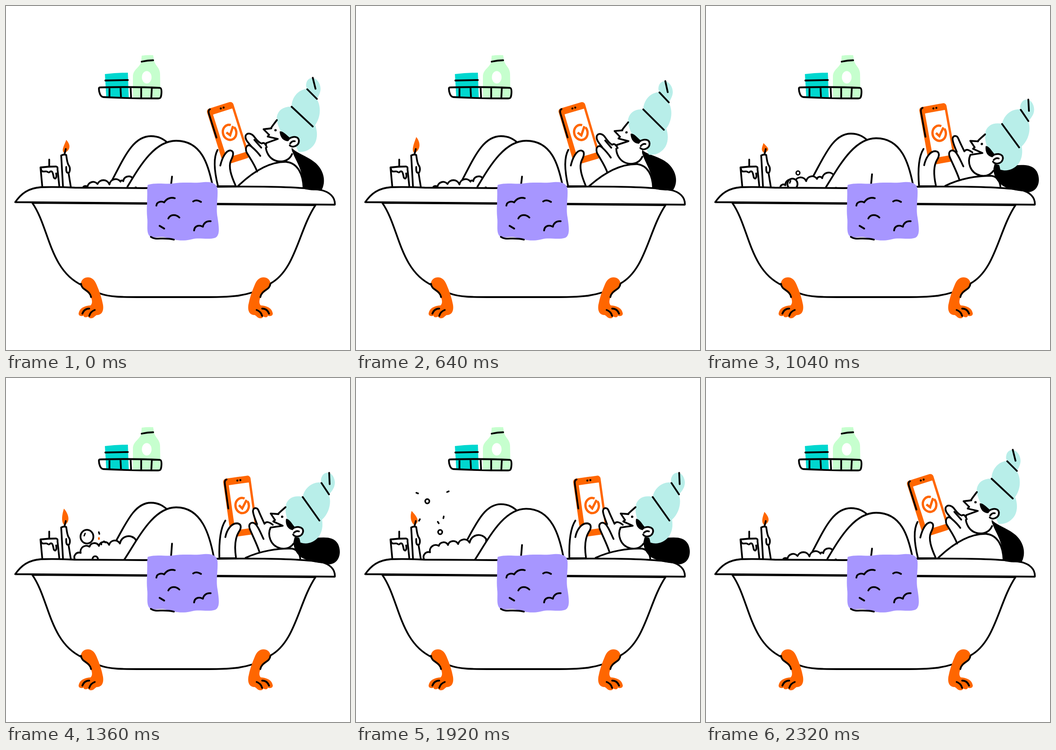
An HTML page that plays this animation: 748x748 px, repeating every 2.4 s.

```html
<!DOCTYPE html>
<html lang="en">
<head>
<meta charset="utf-8">
<title>Bath time</title>
<style>
html, body { margin: 0; width: 100%; height: 100%; overflow: hidden; background: #fff; }
svg { display: block; width: 100%; height: 100%; }
.l { fill: none; stroke: #000; stroke-width: 3.8; stroke-linecap: round; stroke-linejoin: round; }
.w { fill: #fff; }
.o { fill: #ff6600; }
</style>
</head>
<body>
<svg viewBox="0 0 748 748">
  <defs>
    <g id="foot">
      <path class="o" d="M163 603C164 594 171 590 178 590C187 590 193 596 197 606C203 620 208 634 211 650C213 664 208 672 197 672C193 674 191 679 185 679C181 679 179 677 179 675C174 678 168 677 169 673C163 676 157 673 158 668C160 657 170 652 184 651C189 646 187 638 184 632C178 620 165 618 163 603Z"/>
      <path class="l" d="M163 604C165 619 181 616 185 633M166 669C169 661 175 658 181 658M181 674C183 667 187 663 193 661"/>
    </g>
  </defs>

  <g id="shelf">
    <path fill="#00d7cf" d="M215 148Q240 145 265 145L267 199L218 197Z"/>
    <path fill="#c6ffce" d="M295 108Q308 106 320 107L322 120C326 131 335 135 335 148L336 200L276 199L276 152C277 138 290 134 294 122Z"/>
    <ellipse class="w" cx="306" cy="155" rx="10.5" ry="13.5"/>
    <path class="l" d="M216 162L265 161M295 121Q308 118 320 118"/>
    <path class="l" d="M205 177C245 176 298 176 335 178C340 179 338 195 336 199Q335 201 331 201C290 201 250 200 211 198C205 197 202 187 202 180Q202 177 205 177ZM225 178L225 197M249 178L250 198M271 178L272 199M294 178L294 200M317 179L316 200"/>
  </g>

  <g id="candles">
    <path class="l w" d="M79 394L75 351Q92 349 109 349Q113 350 112 355L116 393"/>
    <path class="l" d="M76 354C78 364 84 358 89 360C92 362 94 363 96 360C102 357 102 366 104 373C107 378 111 374 109 364M94 334L94 348"/>
    <path class="l w" d="M124 394L120 325Q126 322 131 324C132 332 133 341 136 346C141 352 139 363 135 363C130 362 131 355 131 350M136 363L141 394"/>
    <path id="flame" class="o"/>
    <path class="l" d="M130 311L127 323"/>
  </g>

  <path id="backLeg" class="l w"/>
  <path id="foam" class="l w"/>
  <g id="bubbles"></g>
  <path id="frontLeg" class="l w"/>
  <path id="crease" class="l"/>
  <path id="body" class="l w"/>
  <path id="arm" class="l w"/>
  <g id="phone">
    <rect class="o" x="-30" y="-64" width="60" height="128" rx="7"/>
    <rect class="w" x="-19" y="-49" width="44" height="99" rx="1"/>
    <path class="l" d="M-22 -62C-28 -61 -27 -53 -27 -46L-27 1"/>
    <circle cx="1" cy="-56.5" r="2.2"/><circle cx="7.5" cy="-56.5" r="2.2"/>
    <g fill="none" stroke="#ff6600" stroke-width="5" transform="translate(4 -1)">
      <path d="M12.500 -8A14.500 16.500 0 1 1 7 -14.500"/>
      <path d="M-7 -2L-1 6L11 -11"/>
    </g>
  </g>
  <path id="leftThumb" class="l w"/>

  <g id="tub">
    <path class="l w" d="M57 428C94 480 94 574 165 607L204 625C225 633 250 633 300 633L440 633C490 633 513 630 535 623L574 604C630 574 636 488 673 433Z"/>
    <path class="l w" d="M20 426.500L715 432C716 416 704 404 684 400C640 393 540 392 460 393L300 396L150 395Q110 393 76 394C48 396 33 408 20 426.500Z"/>
    <use href="#foot"/>
    <use href="#foot" transform="matrix(-1 0 0 1 738 0)"/>
    <path fill="#a796ff" d="M308 389C328 383 345 388 362 386C390 382 410 386 430 383C450 381 460 388 460 400C461 420 456 440 460 460C463 480 466 499 455 504C440 509 420 503 405 507C385 512 370 510 350 504C332 499 322 507 313 501C304 493 309 475 307 460C305 440 308 420 307 400Z"/>
    <path class="l" d="M327 434C328 425 338 424 344 427C349 419 358 415 367 418M407 425C412 421 419 423 424 426M353 462C358 452 370 453 377 460M334 478L344 484M409 488C410 478 420 475 428 480C430 472 436 467 445 468M315 502C326 510 340 502 365 508"/>
  </g>

  <path id="hair"/>
  <g id="head">
    <path class="w" d="M589 249C583 256 577 266 573 278L569 284L591 289L566 298C562 314 572 337 596 338C610 338 619 330 621 316L622 290Z"/>
    <path class="l w" d="M577 266L560 268L572 280"/>
    <path fill="#b8eee9" d="M653 168C655 158 664 154 672 158C682 164 687 178 682 190C680 196 677 200 676 203C685 217 685 242 672 259C677 270 678 286 672 298C664 312 650 319 636 317C630 300 615 288 600 276C592 265 588 250 589 240C592 226 604 218 621 219C621 200 634 182 655 180C652 176 652 172 653 168Z"/>
    <path d="M595 273C601 270 610 281 618 287L614 294C603 294 596 286 595 273Z"/>
    <path class="l" d="M589 248C583 256 578 262 576 266M572 280L569 284L591 289L566 298C562 314 572 337 596 338C610 338 618 331 622 322"/>
    <path class="l w" d="M613 292C617 284 636 280 637 293C637 305 622 309 617 303"/>
    <path class="l" d="M618 299Q622 293 628 294M667 156L673 180M655 181L676 202M621 219L667 262"/>
    <circle cx="586" cy="270" r="2.6"/>
  </g>

  <path id="finger" class="l w"/>
  <path id="rightThumb" class="l w"/>
  <path id="knuckle" class="l"/>
  <path id="tapMarks" class="l"/>
</svg>
<script>
const LOOP = 2400, STEP = 80;
const $ = id => document.getElementById(id);
const draw = (id, d) => $(id).setAttribute('d', d);
const clamp = v => Math.min(1, Math.max(0, v));
const ease = (t, from, to) => { const u = clamp((t - from) / (to - from)); return u * u * (3 - 2 * u); };

// Blend two paths that share one structure.
function mix(a, b, k) {
  const num = /-?\d+(\.\d+)?/g, other = b.match(num);
  let i = 0;
  return a.replace(num, v => (+v + (other[i++] - v) * k).toFixed(2));
}

// Values between rows of [time, ...values].
function track(t, rows) {
  let i = 0;
  while (i < rows.length - 2 && t >= rows[i + 1][0]) i++;
  const a = rows[i], b = rows[i + 1], k = clamp((t - a[0]) / (b[0] - a[0]));
  return a.slice(1).map((v, j) => v + (b[j + 1] - v) * k);
}

const pose = {
  backLeg: ['M228 384C256 332 275 283 315 283C333 283 343 290 351 297', 'M228 374C258 324 276 271 315 271C333 271 343 279 351 286'],
  frontLeg: ['M264 393C290 350 322 293 370 293C425 293 440 345 449 390', 'M257 395C288 348 320 281 370 281C426 281 443 342 452 390'],
  crease: ['M361 371L359 388', 'M361 360L359 387'],
  body: ['M503 393C536 361 572 338 610 339C634 342 646 365 647 396', 'M521 391C553 376 592 370 622 371C635 373 640 385 640 396'],
  arm: ['M500 392L461 392C453 360 450 331 460 313', 'M500 392L464 392C463 360 465 328 477 310'],
  leftThumb: ['M466 347C470 330 478 314 488 314C498 316 493 328 489 336C483 350 490 370 499 390', 'M477 346C480 330 490 316 502 316C514 317 511 328 506 335C497 350 497 370 500 390'],
  hair: ['M619 305C626 335 647 350 646 397C662 402 674 401 687 399C695 383 693 360 674 342C655 325 628 320 619 305Z', 'M626 345C622 372 633 389 656 396C672 402 690 403 704 405C724 403 731 380 722 361C706 334 668 356 626 345Z'],
  knuckle: ['M540 291L555 308', 'M552 301L556 309']
};
const finger = [
  'M534 306C526 296 519 290 521 282C525 274 535 277 541 286C547 294 552 298 556 299C562 295 565 302 567 307',
  'M546 318C542 308 537 296 537 289C538 281 546 281 549 288C553 298 558 308 562 317C566 311 572 313 580 319',
  'M529 312C527 304 520 300 519 294C520 286 538 282 545 289C551 296 545 308 554 318C560 316 566 316 575 321'
];
const thumb = [
  'M546 360C541 345 530 330 523 318C519 306 526 298 534 306C541 312 548 319 553 326',
  'M551 378C546 362 537 345 530 328C526 316 535 311 543 318C550 326 555 340 560 350',
  'M549 377C541 360 528 350 520 333C515 322 520 315 528 322C537 331 545 340 552 349'
];

const foamLow = [[167, 396], [177, 394], [199, 387], [225, 388], [249, 382], [255, 381], [276, 375]];
const foamHigh = [[148, 394], [161, 379], [180, 365], [200, 363], [222, 361], [247, 358], [283, 350]];
function foamPath(k) {
  const p = foamLow.map((a, i) => a.map((v, j) => v + (foamHigh[i][j] - v) * k));
  let d = 'M' + p[0];
  for (let i = 1; i < p.length; i++) {
    const r = Math.hypot(p[i][0] - p[i - 1][0], p[i][1] - p[i - 1][1]) * 0.54;
    d += `A${r} ${r} 0 0 1 ${p[i]}`;
  }
  return d + 'L283 396';
}

const flame = [[0, 131, 291], [320, 126, 288], [640, 131, 285], [840, 117, 296], [1040, 125, 298], [1360, 126, 284],
  [1600, 128, 291], [1920, 121, 289], [2320, 127, 291], [2400, 131, 291]];

// Each bubble rises along its track, then pops; bits are [x, y, kind].
const bubbles = [
  { path: [[920, 198, 390, 3], [1040, 200, 363, 4], [1240, 206, 349, 5]], seen: 1360,
    bits: [[203, 339, 'tick'], [213, 355, 'tick'], [207, 358, 'tick'], [202, 349, 'spark']] },
  { path: [[960, 188, 398, 10], [1040, 188, 387, 11], [1360, 176, 345, 14], [1600, 172, 296, 13], [1800, 165, 262, 13]], seen: 1920,
    bits: [[135, 251, 'tick'], [198, 248, 'tick'], [139, 307, 'tick'], [155, 268, 'ring']] },
  { path: [[1280, 195, 400, 6], [1360, 194, 394, 6], [1600, 189, 367, 7.5], [1840, 186, 325, 9]], seen: 1920,
    bits: [[180, 316, 'tick'], [190, 305, 'tick'], [183, 335, 'ring']] }
];
const ring = (x, y, r, w = 3.8) => `<ellipse class="l w" cx="${x}" cy="${y}" rx="${r}" ry="${r * 1.06}" style="stroke-width:${w}"/>`;

function bubble({ path, seen, bits }, t) {
  const [pop, cx, cy] = path[path.length - 1];
  if (t < path[0][0] || t > seen + 80) return '';
  if (t < pop) {
    const [x, y, r] = track(t, path);
    const shine = r > 10 ? `<path class="l" style="stroke-width:3" d="M${x - 6} ${y - 2}l2 -5"/>` : '';
    return ring(x, y, r, r < 6 ? 3 : 3.8) + shine;
  }
  const k = (t - pop + 40) / (seen - pop + 40);
  return bits.map(([bx, by, kind]) => {
    const dx = bx - cx, dy = by - cy, n = Math.hypot(dx, dy) || 1;
    const x = cx + dx * k, y = cy + dy * k;
    if (kind === 'ring') return ring(x, y, 4.5, 3.5);
    if (kind === 'spark') return `<ellipse class="o" cx="${x}" cy="${y}" rx="2" ry="3"/>`;
    return `<path class="l" style="stroke-width:3.5" d="M${x} ${y}l${dx / n * 4} ${dy / n * 4}"/>`;
  }).join('');
}

function render(t) {
  const back = ease(t, 1920, 2320);
  const lean = ease(t, 480, 1130) - back;
  const tap = ease(t, 1400, 1560) - ease(t, 1640, 1840);
  const reach = ease(t, 480, 1300) - back;
  const tilt = reach - 0.22 * tap;
  const lift = ease(t, 700, 1420) - ease(t, 1700, 2320);
  const level = { backLeg: lift, frontLeg: lift, crease: lift, body: lean, hair: lean, arm: reach, leftThumb: tilt, knuckle: lean };
  for (const id in pose) draw(id, mix(...pose[id], level[id]));
  $('knuckle').style.opacity = lean < 0.6 ? 1 : 0;

  $('head').setAttribute('transform', `translate(${9 * lean} ${39 * lean}) rotate(${11.5 * lean} 625 294)`);
  $('phone').setAttribute('transform', `translate(${483 + 27 * tilt} ${277 + 2 * tilt}) rotate(${-17.5 + 9.5 * tilt})`);
  draw('finger', mix(mix(finger[0], finger[1], lean), finger[2], tap));
  draw('rightThumb', mix(mix(thumb[0], thumb[1], lean), thumb[2], tap));
  draw('tapMarks', tap > 0.9 ? 'M519 280L522 268M529 284L536 277' : '');

  draw('foam', foamPath(ease(t, 800, 1480) - back));
  $('bubbles').innerHTML = bubbles.map(b => bubble(b, t)).join('');
  const [x, y] = track(t, flame);
  draw('flame', `M127 320C119 314 ${x - 4} ${y + 12} ${x} ${y}C${x + 9} ${y + 10} 142 312 127 320Z`);
}

function loop(now) {
  render(Math.floor(now % LOOP / STEP) * STEP);
  requestAnimationFrame(loop);
}
render(0);
requestAnimationFrame(loop);
</script>
</body>
</html>
```
